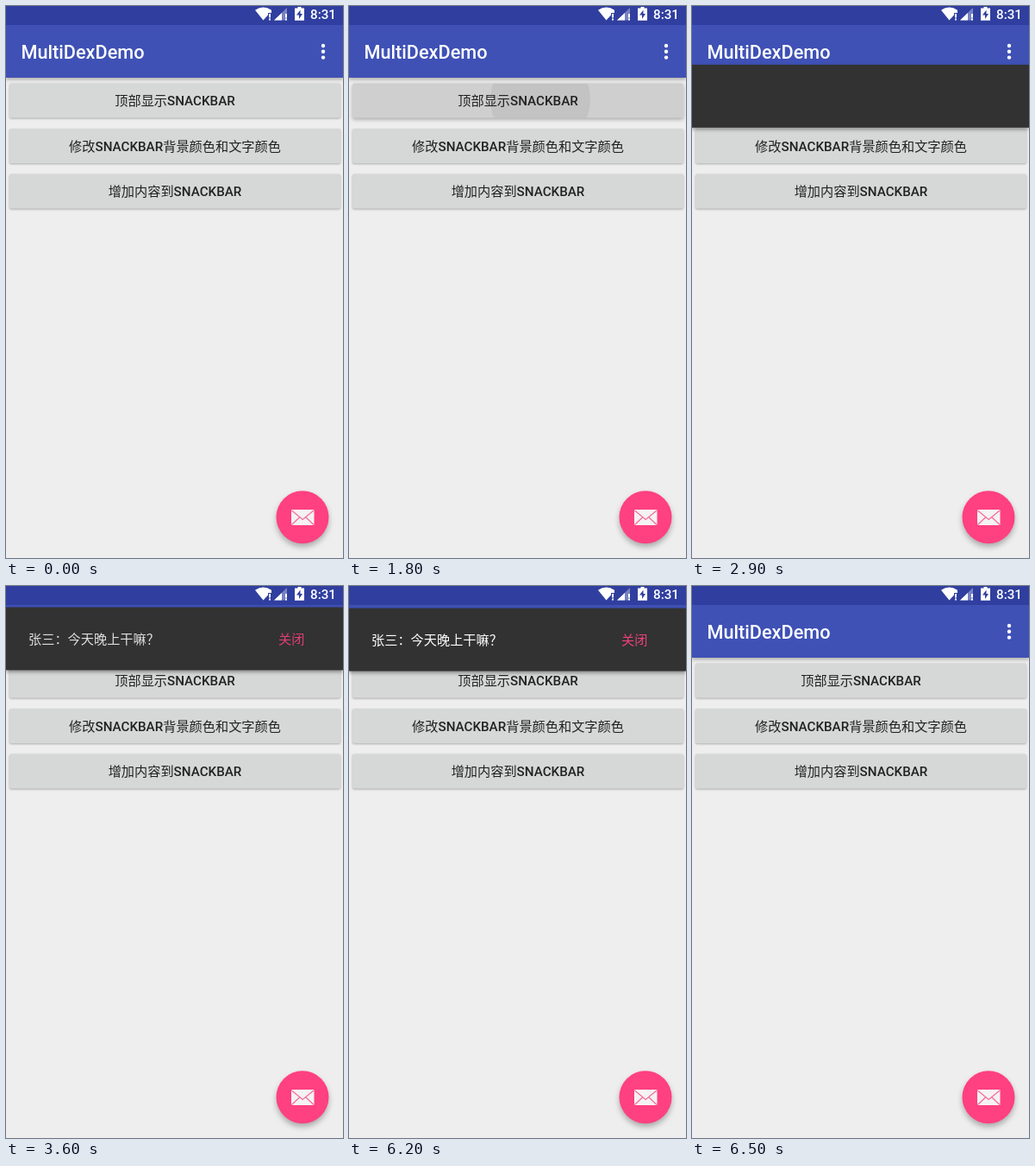
Write an HTML page that moves like this. It is 391 px wide and 639 px high and loops after 8 s.

```html
<!DOCTYPE html>
<html lang="zh-CN">
<head>
<meta charset="utf-8">
<title>Snackbar</title>
<style>
html, body { margin: 0; height: 100%; overflow: hidden; background: #eee; }
svg { display: block; width: 100vw; height: 100vh; }
text { font: 500 15.2px Roboto, "Noto Sans CJK SC", sans-serif; fill: #212121; white-space: pre; }
.cjk { font-weight: 400; }
.light { fill: #fff; }
.button { fill: #d6d7d7; filter: drop-shadow(0 1px 1px rgba(0,0,0,.28)); }
.bar { filter: drop-shadow(0 2px 2px rgba(0,0,0,.3)); }
#snack rect { fill: #323232; filter: drop-shadow(0 2px 2px rgba(0,0,0,.4)); }
.fab { fill: #ff4081; filter: drop-shadow(0 4px 3px rgba(0,0,0,.28)); }
</style>
</head>
<body>
<svg viewBox="0 0 391 639">
  <defs>
    <clipPath id="face"><rect x="4" y="89.5" width="384" height="40" rx="2"/></clipPath>
  </defs>
  <rect width="391" height="639" fill="#eee"/>

  <rect id="press" class="button" x="4" y="89.5" width="384" height="40" rx="2"/>
  <g clip-path="url(#face)"><circle id="ripple" cx="222" cy="108" fill="#000" fill-opacity=".06"/></g>
  <rect class="button" x="4" y="142" width="384" height="40" rx="2"/>
  <rect class="button" x="4" y="194.5" width="384" height="40" rx="2"/>
  <g text-anchor="middle">
    <text x="196" y="115.4"><tspan class="cjk">顶部显示</tspan>SNACKBAR</text>
    <text x="196" y="167.6"><tspan class="cjk">修改</tspan>SNACKBAR<tspan class="cjk">背景颜色和文字颜色</tspan></text>
    <text x="196" y="219.9"><tspan class="cjk">增加内容到</tspan>SNACKBAR</text>
  </g>

  <rect class="bar" width="391" height="83" fill="#3f51b5"/>
  <text class="light" x="17.4" y="61" style="font-size:21.7px">MultiDexDemo</text>
  <g fill="#fff">
    <circle cx="368" cy="46" r="2.2"/><circle cx="368" cy="52.8" r="2.2"/><circle cx="368" cy="59.6" r="2.2"/>
  </g>

  <g id="snack">
    <rect width="391" height="72.8"/>
    <g id="label">
      <text class="light cjk" x="26" y="42.7">张三：今天晚上干嘛？</text>
      <text id="close" class="cjk" x="316" y="42.7">关闭</text>
    </g>
  </g>

  <rect width="391" height="22" fill="#303f9f"/>
  <g fill="#fff">
    <path d="M289 4.8Q298.500-1.800 308 4.800V8H304V10.500L298.500 16.500Z"/>
    <path d="M305 9h2v4.500h-2zM305 14.500h2v2h-2z"/>
    <path d="M326 2V16.500H311Z" opacity=".35"/>
    <path d="M320 8V16.500H311ZM324 9h2v4.500h-2zM324 14.500h2v2h-2z"/>
    <path d="M338.500 1h4v1.600h3.500v14.200h-11V2.600h3.500z"/>
    <path d="M341.500 4.500L337 10.500H340V15L344 9H341.500Z" fill="#303f9f"/>
  </g>
  <text class="light" x="353" y="15">8:31</text>

  <circle class="fab" cx="344" cy="591.7" r="30.5"/>
  <rect x="331" y="583" width="26.500" height="18" rx="1" fill="#f5f2f3"/>
  <path d="M331.500 584L344.200 594.500L357 584M331.500 600.500L340.500 592M357 600.500L348 592" fill="none" stroke="#f56a99" stroke-width="1.2"/>
</svg>
<script>
const $ = id => document.getElementById(id);
const LOOP = 8000;

// [start, button colour, shadow size, ripple radius]
const presses = [
  [0, '#d6d7d7', 1, 0],
  [1200, '#d3d4d3', 1.4, 0],
  [1600, '#cecfce', 2, 0],
  [1800, '#cecfce', 2, 58],
  [2200, '#cecfce', 2, 240],
  [2900, '#d6d7d7', 1, 0]
];

// [start, top, label opacity, action colour]
const slides = [
  [0, null],
  [2200, 95, 0, '#ff4081'],
  [2900, 68, 0, '#ff4081'],
  [3600, 24.6, .84, '#ff4081'],
  [3700, 22, 1, '#ff4081'],
  [4900, 22, 1, '#f0407c'],
  [6200, 25.7, 1, '#f0407c'],
  [6300, 36, .8, '#f0407c'],
  [6500, null]
];

const at = (steps, t) => steps.findLast(s => s[0] <= t);

function draw(now) {
  const t = now % LOOP;
  const [, face, depth, radius] = at(presses, t);
  $('press').style.fill = face;
  $('press').style.filter = `drop-shadow(0 ${depth}px ${depth}px rgba(0,0,0,.28))`;
  $('ripple').setAttribute('r', radius);

  const [, top, opacity, action] = at(slides, t);
  $('snack').style.display = top === null ? 'none' : '';
  if (top !== null) {
    $('snack').setAttribute('transform', `translate(0 ${top})`);
    $('label').style.opacity = opacity;
    $('close').style.fill = action;
  }
}

const start = performance.now();
(function tick() {
  draw(performance.now() - start);
  requestAnimationFrame(tick);
})();
</script>
</body>
</html>
```
